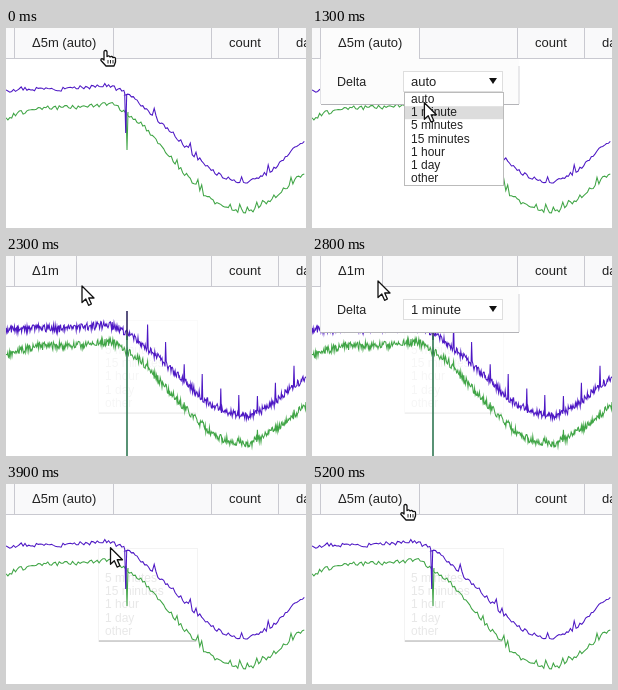
Animation of 300x200 px, one loop 5.3 s. Source, as an HTML page with a canvas:

```html
<!DOCTYPE html>
<html lang="en">
<head>
<meta charset="utf-8">
<style>
  html, body { margin: 0; width: 100%; height: 100%; overflow: hidden; background: #fff; }
  canvas { display: block; }
</style>
</head>
<body>
<canvas id="stage" width="300" height="200"></canvas>
<script>
const ctx = document.getElementById('stage').getContext('2d');
const LOOP = 5300, STEP = 100;
const PURPLE = '#4d17c4', GREEN = '#40a546', BORDER = '#c9c9d0';
const OPTIONS = ['auto', '1 minute', '5 minutes', '15 minutes', '1 hour', '1 day', 'other'];

const upper = [[0, 63], [15, 61], [60, 61], [85, 59], [103, 57], [118, 64], [130, 72], [150, 90],
  [165, 104], [180, 119], [200, 138], [215, 148], [237, 155], [255, 149], [270, 139], [285, 123], [300, 114]];
const lower = [[0, 91], [10, 86], [30, 80], [75, 79], [105, 75], [118, 84], [135, 95], [160, 124],
  [180, 147], [200, 168], [212, 177], [230, 183], [245, 183], [260, 175], [280, 160], [300, 143]];

// time, x, y of the pointer
const pointer = [[0, 94, 22], [300, 97, 24], [500, 106, 34], [700, 110, 42], [900, 110, 46],
  [1400, 113, 82], [1700, 116, 82], [2000, 116, 81], [2300, 76, 30], [2600, 59, 22], [2800, 66, 25],
  [3200, 110, 49], [3400, 110, 50], [3800, 108, 67], [4200, 94, 54], [4400, 91, 41],
  [4700, 87, 28], [5000, 86, 23], [5200, 88, 20]];
const handTimes = [[0, 400], [2400, 2800], [4700, LOOP]];

const within = (t, from, to) => t >= from && t < to;

function lerp(points, x, column = 1) {
  const i = points.findIndex(p => p[0] >= x);
  if (i < 0) return points[points.length - 1][column];
  if (i === 0) return points[0][column];
  const a = points[i - 1], b = points[i];
  return a[column] + (b[column] - a[column]) * (x - a[0]) / (b[0] - a[0]);
}

function random(seed) {
  return () => {
    seed = (seed * 1664525 + 1013904223) >>> 0;
    return seed / 4294967296;
  };
}

function stroke(points, color, width = 1) {
  ctx.beginPath();
  for (const [x, y] of points) ctx.lineTo(x, y);
  ctx.strokeStyle = color;
  ctx.lineWidth = width;
  ctx.stroke();
}

function text(s, x, y, size = 13, color = '#222') {
  ctx.font = `${size}px "Liberation Sans", Arial, sans-serif`;
  ctx.fillStyle = color;
  ctx.fillText(s, x, y);
}

function box(x, y, w, h, fill, border) {
  ctx.fillStyle = fill;
  ctx.fillRect(x, y, w, h);
  ctx.strokeStyle = border;
  ctx.lineWidth = 1;
  ctx.strokeRect(x + .5, y + .5, w - 1, h - 1);
}

function coarse(points, dip, seed) {
  const rnd = random(seed), line = [];
  for (let x = 0; x <= 300; x += 1.9) {
    const spike = x > 125 && rnd() < .1 ? 6 : 0;
    line.push([x, lerp(points, x) + (rnd() - .5) * 4.4 - spike]);
  }
  const i = line.findIndex(p => p[0] > dip[0]);
  line.splice(i, 0, [dip[0] - 1, dip[1] - 40], dip, [dip[0] + 1, dip[1] - 38]);
  return line;
}

function dense(points, spikeHeight, seed) {
  const rnd = random(seed), line = [];
  for (let x = 0; x <= 300; x += .6) {
    const spike = x > 135 && (x - 141) % 18.3 >= 0 && (x - 141) % 18.3 < .6;
    line.push([x, lerp(points, x) * .94 + 15 + (rnd() - .5) * 8 - (spike ? spikeHeight : 0)]);
  }
  return line;
}

const coarseLines = [coarse(lower, [121, 122], 7), coarse(upper, [119.7, 105], 3)];
const denseLines = [dense(lower, 6, 11), dense(upper, 20, 5)];

function chart(fine) {
  const [green, purple] = fine ? denseLines : coarseLines;
  stroke(green, GREEN, 1.05);
  stroke(purple, PURPLE, 1.05);
  if (fine) {
    stroke([[121, 55], [121, 84]], '#30285f', 1.6);
    stroke([[121, 80], [121, 200]], '#2f7752', 1.6);
  }
}

function header(fine, open) {
  const right = fine ? 70.5 : 107.5;
  ctx.fillStyle = '#f9f9fa';
  ctx.fillRect(0, 0, 300, 30);
  stroke([[0, 30.5], [300, 30.5]], BORDER);
  for (const x of [8.5, right, 205.5, 272.5]) stroke([[x, 0], [x, 30]], BORDER);
  if (open) {
    ctx.fillStyle = '#fcfcfc';
    ctx.fillRect(9, 0, right - 9.5, 31);
  }
  text(fine ? 'Δ1m' : 'Δ5m (auto)', 26, 19);
  text('count', 223, 19);
  text('data', 290, 19);
}

function panel(value) {
  ctx.fillStyle = '#fcfcfc';
  ctx.fillRect(8, 31, 199, 45);
  stroke([[8.5, 31], [8.5, 76]], '#e2e2e6');
  stroke([[207, 38], [207, 76]], '#d4d4d8');
  stroke([[9, 76.5], [207, 76.5]], '#b4b4b8');
  text('Delta', 25, 58, 12.5);
  box(91, 43, 100, 21, '#fff', '#dedede');
  text(value, 99, 58);
  ctx.beginPath();
  ctx.moveTo(177, 50);
  ctx.lineTo(185, 50);
  ctx.lineTo(181, 56);
  ctx.fillStyle = '#111';
  ctx.fill();
}

function dropdown(selected) {
  box(92, 64, 100, 94, '#fff', '#bbb');
  if (selected >= 0) {
    ctx.fillStyle = '#dcdcdc';
    ctx.fillRect(93, 65 + selected * 13.2, 98, 13);
  }
  OPTIONS.forEach((name, i) => text(name, 99, 75 + i * 13.2, 12));
}

// Faint remains of the closed list
function afterimage(fine) {
  ctx.globalAlpha = fine ? .04 : .1;
  OPTIONS.slice(2).forEach((name, i) => text(name, 99, 98 + i * 13.2, 12));
  ctx.strokeStyle = '#888';
  ctx.strokeRect(92.5, 64.5, 99, 93);
  ctx.globalAlpha = fine ? .2 : .8;
  stroke([[93, 157], [190, 157]], '#bbb', 1.5);
  ctx.globalAlpha = 1;
}

function tooltips(fine) {
  const label = () => {
    const [x, y, name] = fine ? [130, 82, 'riak_timeline@count'] : [112, 48, 'riak_user@count : 2,1'];
    box(x, y, 200, 20, 'rgba(255,255,255,.9)', fine ? '#e6e6e6' : '#d2d2d2');
    text('LB_Pool>timing>' + name, x + (fine ? 4 : 9), y + (fine ? 13 : 14), 10.3, '#555');
  };
  const x = fine ? 115 : 102;
  box(x, 55, 148, 24, 'rgba(255,255,255,.85)', '#ccc');
  text('We Feb 26, 2014; ' + (fine ? '19:38' : '18:53'), x + 9, 71, 12, '#667');
  label();
  if (fine) stroke([[121, 55], [121, 200]], '#4d8064', 1.4);
}

const arrowPath = new Path2D('M0 0V16.5L3.8 13L6.6 19.3L9.4 18L6.7 12H12Z');
const handPath = new Path2D('M4 10V2Q4 .5 5.5 .5T7 2V6.5Q9 5 10 7Q12 5.7 13 7.6Q15.5 6.8 15.5 9V12L14 16H6L1 10.5Q.5 8.5 2.5 8.8Z');

function cursor(t) {
  const hand = handTimes.some(([from, to]) => within(t, from, to));
  const path = hand ? handPath : arrowPath;
  ctx.save();
  ctx.translate(lerp(pointer, t, 1), lerp(pointer, t, 2));
  ctx.lineJoin = 'round';
  ctx.fillStyle = '#fff';
  ctx.fill(path);
  ctx.strokeStyle = '#111';
  ctx.lineWidth = 1.3;
  ctx.stroke(path);
  if (hand) for (const x of [8, 10.5, 13]) stroke([[x, 10], [x, 13.5]], '#111', .9);
  ctx.restore();
}

function draw(t) {
  const fine = within(t, 1500, 3900);
  const open = within(t, 300, 1500) || within(t, 2700, 3900);
  ctx.fillStyle = '#fff';
  ctx.fillRect(0, 0, 300, 200);
  if (t >= 1500) afterimage(fine);
  chart(fine);
  header(fine, open);
  if (open) panel(fine ? '1 minute' : 'auto');
  if (within(t, 900, 1500)) dropdown(t < 1300 ? 0 : 1);
  if (within(t, 3500, 3900)) dropdown(t < 3700 ? 1 : 0);
  if (within(t, 1600, 2200) || within(t, 4100, 4400)) tooltips(fine);
  cursor(t);
}

function frame(now) {
  draw(Math.floor(now % LOOP / STEP) * STEP);
  requestAnimationFrame(frame);
}
frame(performance.now());
</script>
</body>
</html>
```
